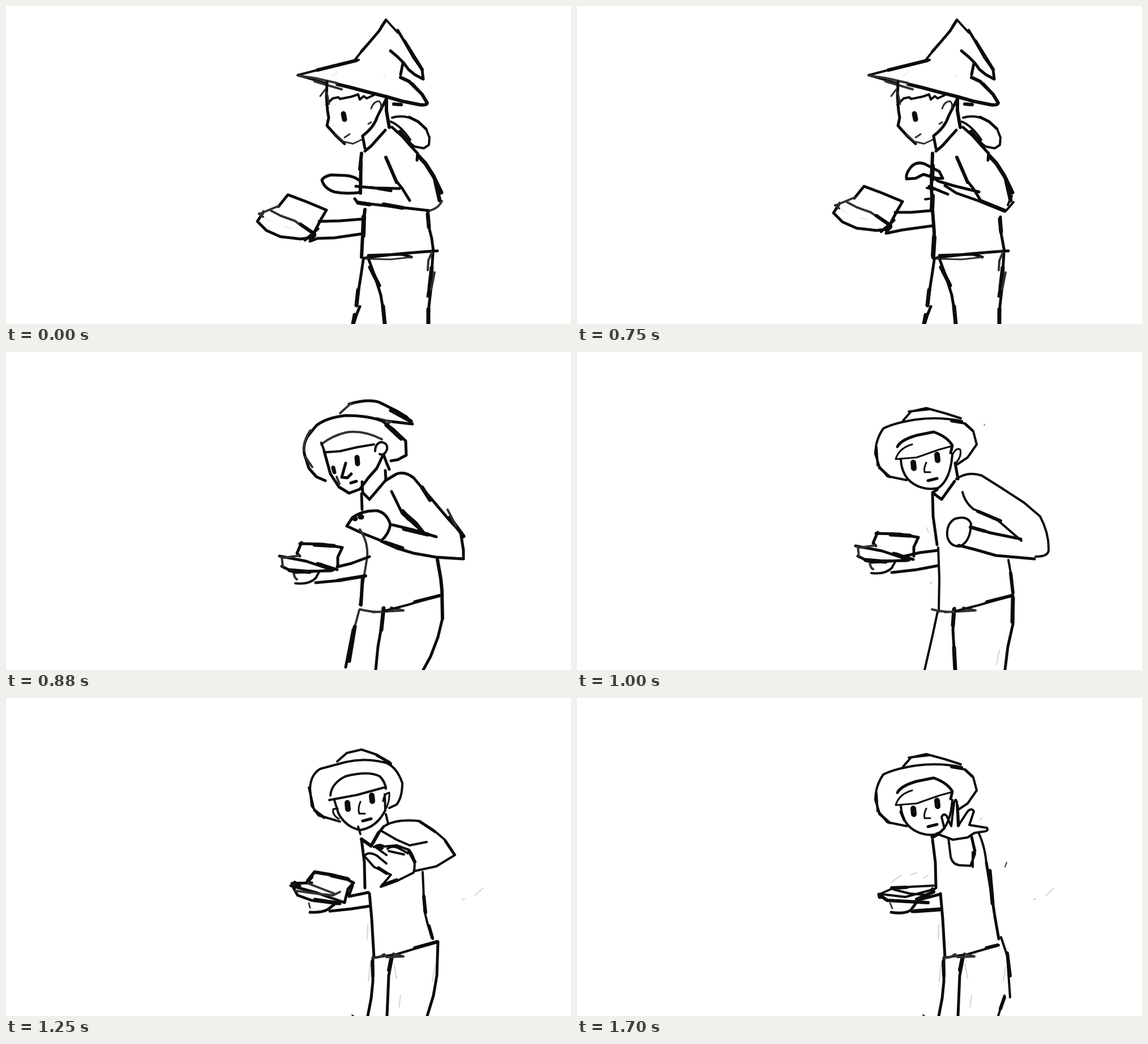
Animation, 998 px wide and 561 px high, one loop 1.92 s. Source, as an HTML page:

```html
<!DOCTYPE html>
<html lang="en">
<head>
<meta charset="utf-8">
<title>Wizard sketch</title>
<style>
html, body { margin: 0; width: 100%; height: 100%; overflow: hidden; background: #fff; }
svg { display: block; width: 100%; height: 100%; fill: none; stroke-linecap: round; stroke-linejoin: round; }
</style>
</head>
<body>
<svg id="stage" viewBox="0 0 998 561"></svg>
<script>
const INK = '#0b0b0b', SOFT = '#333', FAINT = '#d4d4d4';

// Each part is a list of brush strokes: [width, path, colour].
const parts = {
  // bent over the book
  pointedHat: [
    [4, 'M663 36L671 24L692 47M628 80L614 98M623 95L585 105L550 113L515 122L550 132L567 137'],
    [5, 'M671 25L659 44L642 64L628 80M692 43L704 63L720 91L735 112L737 129L722 121L711 112L703 101L692 90L679 79M701 101L697 121'],
    [6, 'M704 62L735 112M697 126L712 133L728 149M718 138L735 156L744 171Q743 176 730 174L700 168L672 160M550 113L619 96'],
    [6, 'M585 138L610 144L640 152L672 160M685 173L698 174'],
    [4, 'M517 123L545 127L585 136M545 133L593 147', SOFT],
    [1, 'M576 124L586 116M667 121L669 125', FAINT]
  ],
  profile: [
    [5, 'M567 134L566 160L568 185L570 197L567 211L574 219L585 231L598 243M630 229Q650 214 656 195L672 163'],
    [4, 'M566 174L577 163L587 161L590 164L610 160L622 156L625 165L632 159L637 163L650 157'],
    [3, 'M555 159L564 147M567 153L571 173M582 226L596 239L613 243L630 235M598 232L607 226M645 181Q649 168 659 168Q664 172 662 179M640 208L645 205', SOFT],
    [9, 'M596 190L598 200'],
    [6, 'M672 160L672 185L677 214'],
    [5, 'M630 230L634 251M634 256L645 247L670 219']
  ],
  hood: [
    [4, 'M682 197Q705 190 728 204L742 217L748 232L747 245L738 251L722 248L705 235M680 204Q698 212 714 236'],
    [5, 'M712 196L728 204L742 217M682 214L700 230L715 247L727 260L726 272'],
    [7, 'M696 222L716 246M728 264L741 278L755 300L769 329M758 308L766 343'],
    [6, 'M671 267L684 297L690 311'],
    [5, 'M688 307L700 322L713 343']
  ],
  legsA: [
    [5, 'M632 445Q680 437 762 432M640 440L700 438L716 443'],
    [3, 'M634 446L680 447L716 443', SOFT],
    [5, 'M631 448L627 475L623 500L619 528M625 530L619 545L614 561M641 448L652 478L662 510L667 540L669 561'],
    [7, 'M643 461L659 493M666 530L669 561M622 501L619 528M616 545L613 561'],
    [5, 'M754 437L752 470L745 512M751 495L747 530L746 561'],
    [7, 'M752 462L748 497M746 535L746 561'],
    [4, 'M757 470L751 500M753 433L746 449L745 466', SOFT]
  ],
  bookA: [
    [5, 'M481 354L498 333L530 345L566 360L556 377L543 402'],
    [5, 'M455 363L444 380L460 396L485 407L520 411L536 409M528 413L540 403L551 393'],
    [4, 'M447 367L481 353M447 366L454 372M468 361L485 370L510 379L545 404', SOFT],
    [6, 'M520 385L545 402M538 412L545 405'],
    [1, 'M457 374L468 380M490 389L505 392', FAINT]
  ],
  armReading: [
    [5, 'M626 309Q615 300 600 299L574 298Q561 301 558 307Q562 322 580 328Q600 332 625 329L627 309'],
    [5, 'M618 318L650 321L695 322M645 320L680 326M616 340L621 347L650 350L748 361'],
    [7, 'M667 350L700 356M622 347L642 350'],
    [4, 'M748 361Q764 357 770 344', SOFT],
    [6, 'M628 260L625 288M627 275L626 330M634 359L631 385L628 443'],
    [8, 'M632 372L631 405'],
    [5, 'M553 380L590 379L628 376M537 415L550 410L580 409L628 402M745 363L747 390L752 410L755 433'],
    [7, 'M745 367L747 390']
  ],
  armLifted: [
    [5, 'M582 305Q580 296 590 284Q600 273 615 279L640 292L646 304L635 304L612 297L598 304L582 305'],
    [5, 'M624 299L638 309L665 317L710 328M622 318L640 326L655 332M650 317L670 330L713 345L756 362'],
    [6, 'M628 260L626 320L628 360L631 400L629 444'],
    [8, 'M628 282L627 306M628 335L627 360M631 408L629 440'],
    [4, 'M615 341L622 340M618 321L640 325M758 361L771 346M761 351L768 335'],
    [5, 'M562 364L590 364L625 361M546 401L575 395L626 388M748 372L748 395L755 433'],
    [7, 'M747 376L749 398M713 344L755 361']
  ],

  // turning
  turnHat: [
    [5, 'M606 92Q640 82 660 89L690 104L708 115L718 127L700 125L675 122'],
    [4, 'M590 108L610 90M655 117L680 123M672 129L678 124', SOFT],
    [5, 'M564 227L548 220L535 205L527 180Q524 160 535 146L548 130Q565 116 600 112Q640 112 665 122L685 137L706 157L707 182L692 190L680 192'],
    [7, 'M672 129L698 153M680 103L715 122'],
    [4, 'M538 138Q525 155 527 175M529 185L541 203', SOFT]
  ],
  turnFace: [
    [4, 'M557 163Q575 148 600 142Q630 137 664 154', SOFT],
    [4, 'M557 160L563 177L590 175L620 168L650 163M652 175Q652 162 662 159Q675 160 673 172Q668 184 660 180'],
    [5, 'M562 175L573 215L588 238L606 249L625 242L640 222L655 205L665 184'],
    [9, 'M620 186L621 197'],
    [7, 'M578 204L580 212'],
    [5, 'M600 196L593 221L603 222L610 215M609 231L619 228M667 181L672 195L677 207M670 209L671 226'],
    [4, 'M584 220L589 233', SOFT],
    [5, 'M629 229L630 248L642 260L670 227M628 250L629 278']
  ],
  turnArm: [
    [5, 'M670 227L690 215Q705 210 720 222L748 255L780 293L803 318L808 350L808 364'],
    [7, 'M735 239L749 261M784 292L808 325M701 281L711 294'],
    [4, 'M780 278L795 307', SOFT],
    [5, 'M681 246L700 285L740 321L725 302L700 280M683 305L720 314L760 326M808 365L760 362L720 355L690 346L663 334'],
    [7, 'M703 312L745 322M670 336L700 346'],
    [5, 'M602 307L612 292Q630 279 655 280Q672 283 679 304Q677 320 663 333L630 320L602 307'],
    [9, 'M626 291L628 291M616 294L617 294'],
    [4, 'M625 313Q640 335 638 362L630 410L625 446', SOFT],
    [6, 'M630 396L627 446'],
    [5, 'M585 379L610 373L642 361M547 407L590 403L635 395'],
    [6, 'M586 403L635 395M762 366L768 400L770 420L771 470'],
    [5, 'M771 470L763 503L750 537L737 561']
  ],
  turnLegs: [
    [4, 'M624 455L616 485', SOFT],
    [7, 'M616 485L606 545M667 452L663 490'],
    [5, 'M613 490L600 556M664 480L657 520L653 561']
  ],
  belt: [
    [4, 'M625 454Q650 460 667 458M648 459L702 456L680 451', SOFT],
    [4, 'M667 457L710 446L766 429'],
    [6, 'M722 441L765 430']
  ],
  bookB: [
    [5, 'M519 338L560 339L594 345L586 362L586 378M522 336L514 355L519 360'],
    [7, 'M545 340L579 342'],
    [5, 'M483 360L530 369L575 384M487 378L505 387L574 386M510 389L577 385M550 373L585 384'],
    [4, 'M487 362L489 378M490 363L519 359M508 390Q510 400 514 401', SOFT],
    [7, 'M555 375L577 384M501 385L536 388'],
    [4, 'M511 408Q535 411 547 399L553 388']
  ],

  // facing the viewer
  frontHead: [
    [4, 'M576 121L590 105L617 99L650 108L678 117M586 105L622 101'],
    [4, 'M680 122Q640 114 600 119Q560 125 541 135Q527 155 527 180L534 202L548 219L582 226'],
    [4, 'M529 168L531 200M661 122L685 126L700 140L706 163L690 186L672 198'],
    [5, 'M566 167Q572 155 600 147L630 141Q655 150 663 165L660 178M686 127L698 138M534 204L552 220'],
    [3, 'M563 189L600 186L640 172L662 166M563 189Q568 170 592 163'],
    [10, 'M594 195L595 205M636 181L637 191'],
    [3, 'M617 195Q612 205 614 212L624 212'],
    [5, 'M620 227L636 223'],
    [4, 'M572 190Q574 220 595 233Q615 245 638 240Q660 225 663 180']
  ],
  neck: [
    [3, 'M664 180Q670 168 677 172Q680 185 668 197'],
    [5, 'M668 196L673 224M628 248L644 260L667 228M628 248L636 243'],
    [5, 'M628 250L629 290L636 340'],
    [4, 'M638 345L640 400L639 458'],
    [1, 'M719 127L720 130', SOFT],
    [2, 'M624 409L627 406M746 526L741 552M617 310L621 318', FAINT]
  ],
  frontLegs: [
    [4, 'M637 458L628 500L614 561'],
    [5, 'M667 452L664 490L668 561M770 430L770 480L761 520L756 561'],
    [7, 'M666 454L664 482M666 522L668 561M770 434L769 476'],
    [4, 'M762 367L768 400L770 427'],
    [6, 'M766 390L770 425']
  ],
  armBack: [
    [4, 'M670 224Q690 210 715 218L750 240L790 266L818 290Q834 320 833 350Q832 361 810 361'],
    [5, 'M808 365L775 362L740 359L705 349L674 341M700 310L730 319L784 330'],
    [4, 'M681 247Q685 265 700 277L740 294L785 333M668 294Q690 288 696 303Q695 335 676 343Q658 343 654 325Q652 303 668 294'],
    [6, 'M708 281L748 298M695 309L720 316'],
    [5, 'M575 361L605 354L637 350M556 389L600 384L637 377']
  ],
  armOut: [
    [4, 'M670 224Q690 210 715 217L770 245L828 266Q848 282 846 298Q840 312 815 314L760 321L703 329'],
    [4, 'M681 247Q690 270 710 278L750 289L783 289M700 298L740 295L783 289'],
    [5, 'M721 325L790 317M738 294L783 288'],
    [4, 'M655 328Q654 308 668 295Q690 286 701 303L704 330M655 328L664 332'],
    [3, 'M662 325L669 304L673 317L683 294L682 316L694 299L698 309M660 316L668 325'],
    [2, 'M665 333L700 328M690 336L722 331', SOFT],
    [3, 'M762 322L764 367'],
    [5, 'M600 353L638 347M565 384L600 380L640 374']
  ],

  // reaching forward
  reachHead: [
    [4, 'M585 112L602 97L628 91L655 100L680 116M680 117Q640 104 600 113L555 125Q538 135 537 160L540 190L552 207L590 218'],
    [4, 'M535 158L543 192M668 113Q690 120 700 150Q700 175 690 188L677 194'],
    [5, 'M655 101L678 114M545 198L562 211'],
    [4, 'M573 172Q575 150 600 138Q640 128 660 138Q670 148 671 160M571 180L620 171L671 157'],
    [10, 'M603 185L604 196M646 172L647 182'],
    [3, 'M626 183Q621 195 624 204L634 204M666 182Q668 168 677 167Q678 180 672 194M588 213Q576 207 578 196L586 195'],
    [5, 'M630 217L645 213'],
    [4, 'M580 180L587 203Q600 228 626 233Q655 228 670 198L669 170'],
    [4, 'M671 205L675 222M622 227L626 240'],
    [6, 'M628 249L645 261L658 238']
  ],
  reachArm: [
    [4, 'M670 225Q690 213 730 217L755 233L775 250L793 277L760 297L723 305M664 235L690 250L713 260L743 254'],
    [5, 'M731 218L758 236M776 252L792 276M667 227L658 238'],
    [4, 'M650 263Q660 256 668 262L690 260L712 268Q726 285 720 308L692 322L662 333L678 314'],
    [4, 'M634 278Q640 270 655 278L672 292M635 281L650 298L680 312M654 264L672 277M674 266Q680 260 692 264L710 274M676 270L703 276'],
    [6, 'M665 330L690 321M712 270L722 289M655 262L664 265M658 300L672 309'],
    [4, 'M736 307L739 375L745 400L754 425'],
    [6, 'M738 350L741 378M747 402L753 423'],
    [5, 'M572 376L610 372L643 367M606 350L640 343'],
    [4, 'M650 458L690 452L763 430'],
    [6, 'M722 441L762 430'],
    [5, 'M763 430L761 490L755 525L744 561']
  ],
  bookC: [
    [6, 'M533 322L545 307L575 312L605 320M531 326L540 316'],
    [5, 'M505 327L540 326M503 331L550 344L598 361M508 335L515 348L540 357L590 363M598 361L604 337L614 326L606 322M606 348L612 331'],
    [4, 'M511 340L555 346L578 348L590 342M533 327L580 345', SOFT],
    [7, 'M546 356L585 362M510 326L518 332M575 313L602 319'],
    [3, 'M535 362L537 370', SOFT],
    [5, 'M537 378Q560 379 570 372L580 364']
  ],
  lean: [
    [5, 'M628 250L633 290L634 335M642 345L646 390L650 458'],
    [5, 'M648 458L648 500L645 530L639 561M683 454L676 490L673 561'],
    [6, 'M647 465L648 490M681 455L676 480'],
    [4, 'M648 459L660 457L668 452L672 457L702 456L684 451', SOFT],
    [2, 'M639 400L638 425M643 470L640 500M685 468L690 495M697 525L694 545M757 475L753 500M806 356L810 354M829 348L842 336', FAINT],
    [2, 'M611 559L614 561']
  ],
  palm: [
    [4, 'M637 240L649 230L644 210Q648 202 653 208L661 226L666 185Q669 175 671 184L673 226L690 200Q697 193 701 200L693 224L724 229Q727 233 722 235L702 238L690 246L664 250L637 240'],
    [4, 'M656 247L660 280Q663 293 675 295L695 296L703 275L697 245M699 272L699 298M709 237Q720 260 723 290'],
    [5, 'M697 245L703 270M723 290L732 345L738 385L745 425M672 190L674 225M572 201L578 215'],
    [7, 'M729 305L734 362M637 240L628 245'],
    [4, 'M650 458L690 452L745 436M749 422L760 455L765 528M755 525L744 561'],
    [6, 'M723 441L743 436M760 450L765 490M755 528L748 548'],
    [2, 'M759 290L756 298', SOFT],
    [2, 'M555 325L572 313M590 312L600 308M612 318L620 312M712 215L715 212', FAINT]
  ],
  bookD: [
    [4, 'M535 346L555 337L590 333L630 331M537 346L580 351L632 337M560 338L588 345L622 348'],
    [6, 'M535 348L548 357L620 361M556 335L582 334M600 355L630 342L628 337'],
    [5, 'M600 357L642 346M592 377L644 372M555 378Q578 382 590 374L600 360'],
    [3, 'M553 362L557 371', SOFT],
    [7, 'M597 376L640 373M534 347L535 351']
  ]
};

// [start ms, parts]; a part may carry an offset as name,dx,dy
const poses = [
  [0, 'pointedHat profile hood legsA bookA armReading'],
  [750, 'pointedHat profile hood legsA bookA,9,-15 armLifted'],
  [880, 'turnHat turnFace turnArm turnLegs belt bookB'],
  [1000, 'frontHead neck frontLegs belt,2,0 bookB,9,-18 armBack'],
  [1130, 'frontHead neck frontLegs belt,2,0 bookB,18,-22 armOut'],
  [1250, 'reachHead reachArm lean bookC'],
  [1380, 'frontHead palm lean bookD']
];
const LOOP = 1920;

const stage = document.getElementById('stage');

function add(parent, tag, attrs) {
  const el = document.createElementNS('http://www.w3.org/2000/svg', tag);
  for (const key in attrs) el.setAttribute(key, attrs[key]);
  return parent.appendChild(el);
}

const layers = poses.map(([, names]) => {
  const layer = add(stage, 'g', { display: 'none' });
  for (const item of names.split(' ')) {
    const [name, dx = 0, dy = 0] = item.split(',');
    const group = add(layer, 'g', { transform: `translate(${dx} ${dy})` });
    for (const [width, d, ink = INK] of parts[name]) {
      add(group, 'path', { d, stroke: ink, 'stroke-width': width });
    }
  }
  return layer;
});

let shown = -1;
function draw(ms) {
  const t = ms % LOOP;
  const now = poses.filter(([start]) => start <= t).length - 1;
  if (now === shown) return;
  if (shown >= 0) layers[shown].setAttribute('display', 'none');
  layers[now].setAttribute('display', 'inline');
  shown = now;
}

const begin = performance.now();
function tick() {
  draw(performance.now() - begin);
  requestAnimationFrame(tick);
}
tick();
</script>
</body>
</html>
```
